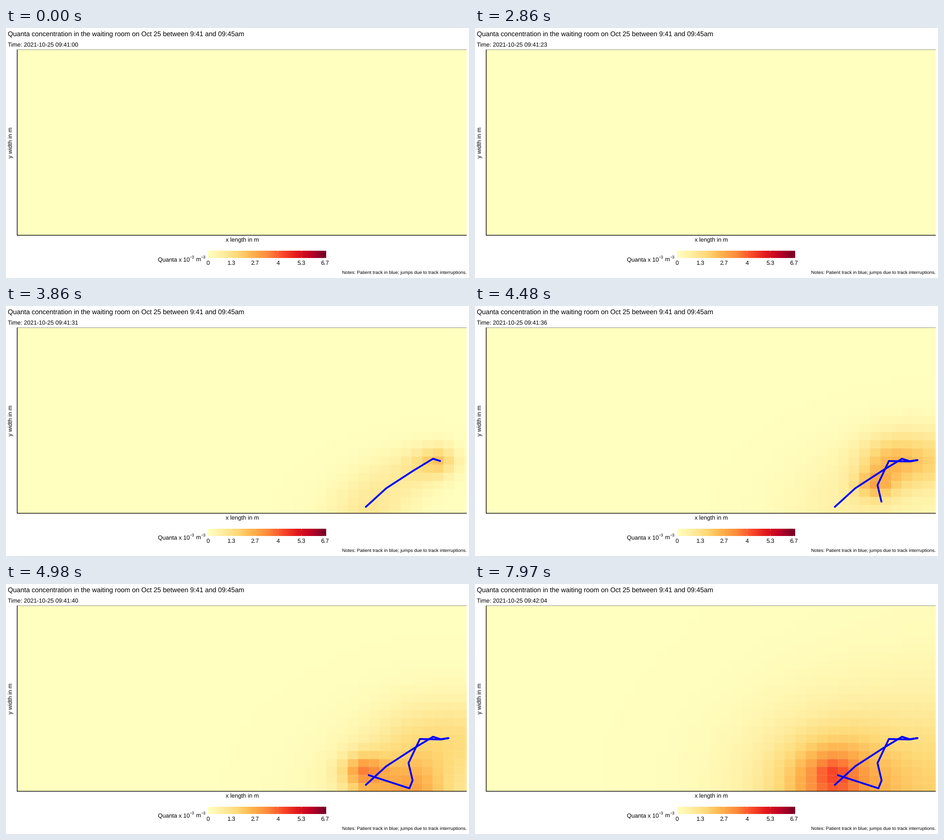
Animation, 1018 px wide and 550 px high, one loop 8 s. Source, as a matplotlib script:

```python
import matplotlib.pyplot as plt
import numpy as np
from matplotlib.animation import FuncAnimation
from matplotlib.colors import LinearSegmentedColormap
from matplotlib.patches import Rectangle

plt.rcParams["font.family"] = "Liberation Sans"
plt.rcParams["text.hinting"] = "none"

W, H = 1018, 550
FRAMES, INTERVAL = 160, 50
SECOND_MS = 124.5          # playback time of one recorded second
LAST_SECOND = 64
PT = 0.72                  # pixels to points at 100 dpi

# Room panel in pixels and its grid of cells
LEFT, RIGHT, TOP, BOTTOM = 24.5, 1013, 48, 456
COLS, ROWS = 43, 23
CELL_W, CELL_H = 23.43, 17.87
VMAX = 6.75

# Patient position, one point per second from START on
START = 27
TRACK = np.array([
    (790, 443), (836, 401), (896, 362), (939, 336), (956, 341.5),
    (973, 339), (956, 342), (910, 341), (885, 394), (894, 432),
    (887, 449.5), (796, 420), (796, 420),
])
MOVING_RATE, RESTING_RATE = 18, 7.8
DIFFUSION, SUBSTEPS = 0.075, 12

CMAP = LinearSegmentedColormap.from_list("quanta", [
    "#ffffc0", "#ffeda0", "#fed976", "#feb24c", "#fd8d3c",
    "#fc4e2a", "#e31a1c", "#bd0026", "#700026",
], N=1024)


def diffuse(c):
    """Spread the concentration for one second inside closed walls."""
    for _ in range(SUBSTEPS):
        p = np.pad(c, 1, mode="edge")
        around = p[:-2, 1:-1] + p[2:, 1:-1] + p[1:-1, :-2] + p[1:-1, 2:]
        c = c + DIFFUSION * (around - 4 * c)
    return c


def simulate():
    c = np.zeros((ROWS, COLS))
    fields = []
    for second in range(LAST_SECOND + 1):
        fields.append(c.copy())
        step = second - START
        if step >= 0:
            x, y = TRACK[min(step, len(TRACK) - 1)]
            rate = MOVING_RATE if step < len(TRACK) else RESTING_RATE
            c[int((BOTTOM - y) / CELL_H), int((x - LEFT) / CELL_W)] += rate
            c = diffuse(c)
    return fields


fields = simulate()

fig = plt.figure(figsize=(W / 100, H / 100), dpi=100, facecolor="white")
ax = fig.add_axes([0, 0, 1, 1])
ax.axis("off")


def label(x, y, text, size=12.85, **kw):
    return ax.text(x, y, text, fontsize=size * PT, color="black",
                   va="baseline", **kw)


def line(xs, ys, color, width, **kw):
    return ax.plot(xs, ys, color=color, lw=width * PT, snap=False,
                   solid_capstyle="butt", **kw)[0]


# Heat map, cut off at the panel's edges
panel = Rectangle((LEFT, TOP), RIGHT - LEFT, BOTTOM - TOP,
                  transform=ax.transData)
heat = ax.imshow(
    fields[0], cmap=CMAP, vmin=0, vmax=VMAX, origin="lower", aspect="auto",
    interpolation="nearest",
    extent=(LEFT, LEFT + COLS * CELL_W, BOTTOM, BOTTOM - ROWS * CELL_H))
heat.set_clip_path(panel)

# Faint seams between cells, visible only on darker cells
seam = dict(colors=[CMAP(0.0)], lw=PT, alpha=0.14)
ax.vlines(LEFT + CELL_W * np.arange(1, COLS), TOP, BOTTOM, **seam)
ax.hlines(BOTTOM - CELL_H * np.arange(1, ROWS), LEFT, RIGHT, **seam)

line([LEFT, RIGHT], [47.7, 47.7], "#8c8c84", 1)
line([24.6, 24.6], [47.5, 456.5], "black", 1.4)
line([24, RIGHT], [456, 456], "black", 1.4)

track = line([], [], "#0000ff", 4, solid_joinstyle="round")

# Texts
label(4.5, 17.4, "Quanta concentration in the waiting room on Oct 25 "
      "between 9:41 and 09:45am", 14.76)
clock = label(4.5, 40.5, "", 12.92)
label(519, 470.3, "x length in m", ha="center")
label(14.5, 252, "y width in m", ha="center", rotation=90,
      rotation_mode="anchor")
label(1013.5, 541.3, "Notes: Patient track in blue; jumps due to track "
      "interruptions.", 10.25, ha="right")

# Legend
label(334, 513.2, "Quanta x 10")
label(404, 507.2, "\u22123", 9.1)
label(417.5, 513.2, "m")
label(428.5, 507.2, "\u22123", 9.1)
ax.imshow(np.linspace(0, 1, 260)[None, :], cmap=CMAP, aspect="auto",
          extent=(444, 703.5, 506, 490))
for i, text in enumerate(["0", "1.3", "2.7", "4", "5.3", "6.7"]):
    x = 444 + 51.4 * i
    label(x, 521.3, text, ha="center")
    for y in (490, 502.7):
        line([x, x], [y, y + 3.3], "white", 0.7, alpha=0.5)

ax.set_xlim(0, W)
ax.set_ylim(H, 0)


def update(i):
    second = min(int((i * INTERVAL + 35) / SECOND_MS), LAST_SECOND)
    clock.set_text(f"Time: 2021-10-25 09:{41 + second // 60}:{second % 60:02d}")
    heat.set_data(fields[second])
    path = TRACK[:max(second - START + 1, 0)]
    track.set_data(path[:, 0], path[:, 1])
    return heat, track, clock


anim = FuncAnimation(fig, update, frames=FRAMES, interval=INTERVAL,
                     repeat=True, repeat_delay=0)
plt.show()
```
